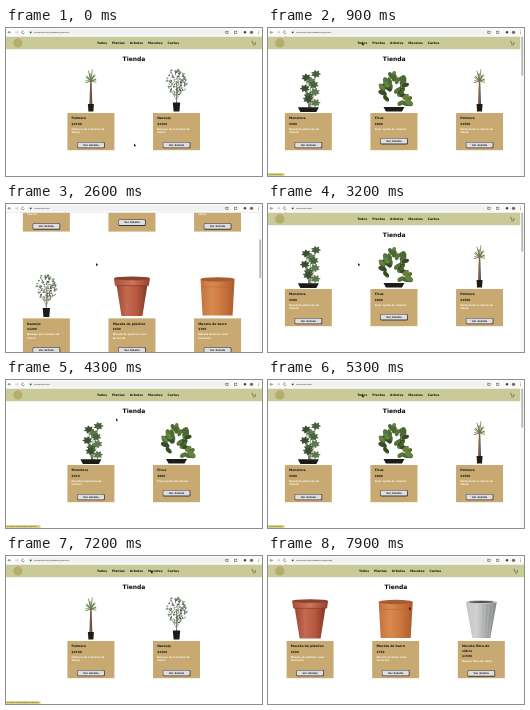
These frames come from a looping animation (256 px wide and 148 px high, 8000 ms). An HTML page with a canvas:

```html
<!DOCTYPE html>
<html lang="es">
<head>
<meta charset="utf-8">
<title>Tienda</title>
<style>
html, body { margin: 0; width: 100%; height: 100%; overflow: hidden; background: #fff; }
canvas { display: block; width: 256px; height: 148px; }
</style>
</head>
<body>
<canvas id="stage"></canvas>
<script>
const WIDTH = 256, HEIGHT = 148, LOOP = 8000, BAR = 8.6;
const TRAVEL = 450, URL_DELAY = 300, HINT_LINGER = 400;
const TAU = Math.PI * 2;
const BOLD = '"DejaVu Sans", Verdana, sans-serif';
const PLAIN = 'Roboto, Arial, sans-serif';
const HOST = 'localhost:3000';
const LINKS = ['Todos', 'Plantas', 'Arboles', 'Macetas', 'Cactus'];

const canvas = document.getElementById('stage');
const ctx = canvas.getContext('2d');
const ratio = window.devicePixelRatio || 1;
canvas.width = WIDTH * ratio;
canvas.height = HEIGHT * ratio;

const catalogue = [
  { kind: 'Plantas', name: ['Monstera'], price: '$500', about: ['Monstera deliciosa de', 'interior'], draw: drawMonstera },
  { kind: 'Plantas', name: ['Ficus'], price: '$800', about: ['Ficus lyrata de interior'], draw: drawFicus },
  { kind: 'Arboles', name: ['Palmera'], price: '$2500', about: ['Palmera de 2 metros de', 'altura'], draw: drawPalm },
  { kind: 'Arboles', name: ['Naranjo'], price: '$2200', about: ['Naranjo de 2 metros de', 'altura'], draw: drawOrange },
  { kind: 'Macetas', name: ['Maceta de plástico'], price: '$500', about: ['Maceta de plástico color', 'terracota'], draw: drawPlasticPot },
  { kind: 'Macetas', name: ['Maceta de barro'], price: '$700', about: ['Maceta de barro color', 'terracota'], draw: drawClayPot },
  { kind: 'Macetas', name: ['Maceta fibra de', 'vidrio'], price: '$1500', about: ['Maceta fibra de vidrio'], draw: drawFiberPot }
];

// The pointer arrives on a link, clicks it, then leaves for a resting place.
const start = { link: 'Arboles', x: 128, y: 115.5 };
const visits = [
  { link: 'Todos', arrive: 500, click: 650, leave: 1350, x: 90, y: 59 },
  { link: 'Plantas', arrive: 3750, click: 4050, leave: 4050, x: 112, y: 55 },
  { link: 'Todos', arrive: 4850, click: 4950, leave: 5350 },
  { link: 'Arboles', arrive: 5850, click: 5950, leave: 6050, x: 137, y: 52.5 },
  { link: 'Macetas', arrive: 7150, click: 7450, leave: 7450, x: 141, y: 51 }
];

const clamp = u => Math.min(1, Math.max(0, u));
const ease = u => clamp(u) ** 2 * (3 - 2 * clamp(u));
const mix = (a, b, u) => a + (b - a) * u;
const scrollAt = t => 143 * Math.sin(Math.PI * clamp((t - 2350) / 830)) ** 2;
const linkAt = t => visits.reduce((link, v) => t >= v.click ? v.link : link, start.link);
const urlOf = link => link === 'Todos' ? HOST : `${HOST}/category/${link.toLowerCase()}`;
const contentWidth = link => link === 'Todos' ? 252.5 : WIDTH;

function seeded(seed) {
  return () => (seed = (seed * 16807) % 2147483647) / 2147483647;
}

function text(value, x, y, size, color, { font = BOLD, align = 'left', weight = 'bold' } = {}) {
  ctx.font = `${weight} ${size}px ${font}`;
  ctx.textAlign = align;
  ctx.textBaseline = 'middle';
  ctx.fillStyle = color;
  ctx.fillText(value, x, y);
}

function rect(x, y, w, h, color) {
  ctx.fillStyle = color;
  ctx.fillRect(x, y, w, h);
}

function oval(x, y, rx, ry, color, angle = 0) {
  ctx.fillStyle = color;
  ctx.beginPath();
  ctx.ellipse(x, y, rx, ry, angle, 0, TAU);
  ctx.fill();
}

function line(x1, y1, x2, y2, color, width = 0.5) {
  ctx.strokeStyle = color;
  ctx.lineWidth = width;
  ctx.beginPath();
  ctx.moveTo(x1, y1);
  ctx.lineTo(x2, y2);
  ctx.stroke();
}

function taper(top, bottom, halfTop, halfBottom, color) {
  ctx.fillStyle = color;
  ctx.beginPath();
  ctx.moveTo(-halfTop, top);
  ctx.lineTo(halfTop, top);
  ctx.lineTo(halfBottom, bottom);
  ctx.lineTo(-halfBottom, bottom);
  ctx.fill();
}

function shade(half, ...colors) {
  const gradient = ctx.createLinearGradient(-half, 0, half, 0);
  colors.forEach((c, i) => gradient.addColorStop(i / (colors.length - 1), c));
  return gradient;
}

function lobedLeaf(x, y, size, angle, color) {
  ctx.fillStyle = color;
  ctx.beginPath();
  for (let a = 0; a < TAU; a += 0.2) {
    const r = size * (0.85 + 0.22 * Math.cos(a * 7));
    ctx.lineTo(x + r * Math.cos(a + angle), y + r * 0.8 * Math.sin(a + angle));
  }
  ctx.fill();
}

// Products stand on the card's top edge, centred on x = 0.
function drawMonstera() {
  const greens = ['#4a613e', '#384f31', '#607850'];
  for (let i = 0; i < 9; i++) {
    const x = 2 + 5.5 * Math.cos(i * 2.4), y = 46 + i * 3.6;
    line(1, 81, x, y, '#60784c', 0.6);
    lobedLeaf(x, y, 4.8, i, greens[i % 3]);
  }
  taper(79.3, 84, 10.5, 8, '#1b1b19');
}

function drawFicus() {
  const random = seeded(91), greens = ['#4c6833', '#65823f', '#344d28', '#587438'];
  for (let i = 0; i < 42; i++) {
    const a = -Math.PI * random(), r = 0.35 + 0.65 * Math.sqrt(random());
    const x = Math.cos(a) * r * 15.5, y = 76 + Math.sin(a) * r * 31;
    oval(x, y, 3.7, 2.1, greens[i % 4], a + random() - 0.5);
  }
  taper(79, 83.5, 10.5, 8, '#1b1b19');
}

function drawPalm() {
  const greens = ['#647b43', '#87995a', '#475f35'];
  taper(53, 79, 0.7, 1.5, shade(1.5, '#503b2d', '#87614a', '#3f3027'));
  for (let i = 0; i < 15; i++) {
    const a = -Math.PI * (i / 14 * 1.1 - 0.05);
    const reach = 9 + 3 * Math.sin(i * 2.3);
    line(0, 53, Math.cos(a) * 5.5, 53 + Math.sin(a) * reach, greens[i % 3], 0.8);
  }
  taper(76, 83.5, 3, 2.5, '#1b1b19');
}

function drawOrange() {
  const random = seeded(47), greens = ['#5d6b58', '#818d7c', '#465443', '#a0a899'];
  line(0, 77, 0, 53, '#67594c', 0.8);
  for (let i = 0; i < 115; i++) {
    const a = random() * TAU, r = Math.sqrt(random());
    const x = Math.cos(a) * r * 10.5, y = 54 + Math.sin(a) * r * 13.5;
    if (i % 16 === 0) line(0, 72, x, y, '#84887a', 0.4);
    oval(x, y, 1.25, 0.55, greens[i % 4], random() * Math.PI);
  }
  taper(74.5, 83.5, 3.7, 2.9, '#1b1b19');
}

function drawPlasticPot() {
  taper(51, 82.5, 15.5, 10.5, shade(15, '#9d4936', '#c46a50', '#b6583f', '#823828'));
  taper(45, 52, 18, 17, shade(18, '#a84f3a', '#ce765b', '#92402e'));
  oval(0, 45, 18, 1.8, '#8c402e');
  line(-16.5, 52.3, 16.5, 52.3, '#8b3c2a', 0.7);
}

function drawClayPot() {
  taper(46, 82, 17, 15, shade(17, '#c4713c', '#d98a50', '#ca743f', '#ad592c'));
  oval(0, 46, 17, 2.2, '#a85a30');
  line(-16.5, 53.5, 16.5, 53.5, '#b6632f');
}

function drawFiberPot() {
  taper(46, 82, 15.5, 9, shade(15, '#c2c3c4', '#d0d0d0', '#a3a5a6', '#85878a'));
  oval(0, 46, 15.5, 1.9, '#c9cacb');
  oval(0, 46, 12.5, 1.1, '#505254');
  for (let i = -3; i < 4; i++) line(i * 4, 48, i * 2.5, 81, '#dedede', 0.25);
}

function drawButton(y) {
  ctx.beginPath();
  ctx.roundRect(-13.7, y - 3.1, 27.6, 6.4, 1.3);
  ctx.fillStyle = '#3a3836';
  ctx.fill();
  ctx.beginPath();
  ctx.roundRect(-13.2, y - 2.6, 26.3, 5, 0.9);
  ctx.fillStyle = '#dedee0';
  ctx.fill();
  text('Ver detalle', 0, y, 2.5, '#272931', { align: 'center' });
}

function drawCard(product, x, offset) {
  ctx.save();
  ctx.translate(x, offset);
  product.draw();
  rect(-23.5, 85, 47, 37.2, '#c8a972');
  let y = 90.6;
  const write = (label, size, color, step) => {
    text(label, -19.3, y, size, color);
    y += step;
  };
  product.name.forEach(label => write(label, 3.1, '#14110d', 4.2));
  y += 1.3;
  write(product.price, 2.9, '#1c1812', 4.8);
  product.about.forEach(label => write(label, 2.45, '#fffaf0', 3.8));
  drawButton(y + 8.5);
  ctx.restore();
}

function linkLeft(link, middle) {
  ctx.font = `bold 3.1px ${BOLD}`;
  return LINKS.slice(0, LINKS.indexOf(link))
    .reduce((x, label) => x + ctx.measureText(label).width + 4.9, middle - 37);
}

function drawCart(x) {
  line(x - 2.2, 13.2, x - 1.3, 13.2, '#33332a', 0.45);
  line(x - 1.3, 13.2, x - 0.6, 16, '#33332a', 0.45);
  line(x - 0.6, 16, x + 1.6, 16, '#33332a', 0.45);
  line(x + 1.6, 16, x + 2, 14, '#33332a', 0.45);
  for (const dx of [-0.3, 1.3]) oval(x + dx, 17.1, 0.45, 0.45, '#33332a');
}

function drawPage(link, scroll) {
  const width = contentWidth(link), middle = width / 2;
  const shown = catalogue.filter(p => link === 'Todos' || p.kind === link);
  ctx.save();
  ctx.beginPath();
  ctx.rect(0, BAR, WIDTH, HEIGHT - BAR);
  ctx.clip();
  ctx.translate(0, -scroll);
  rect(0, BAR, width, 12.6, '#c9ca98');
  oval(11.8, 15, 4.7, 4.7, '#b5ae6c');
  LINKS.forEach(label => text(label, linkLeft(label, middle), 15.2, 3.1, '#14140f'));
  drawCart(width - 8.3);
  text('Tienda', middle, 31.2, 6, '#0c0c0c', { align: 'center' });
  shown.forEach((product, i) => {
    const row = Math.floor(i / 3);
    const columns = Math.min(3, shown.length - row * 3);
    drawCard(product, middle - 0.3 + (i % 3 - (columns - 1) / 2) * 85.6, row * 124);
  });
  ctx.restore();
  if (width < WIDTH) {
    rect(width, BAR, WIDTH - width, HEIGHT - BAR, '#f8f8f8');
    rect(width + 0.9, 9 + scroll * 0.281, 1.7, 38.5, '#b5b5b5');
  }
}

function drawArrow(x, direction, color) {
  const tip = x + direction * 1.5;
  line(x - 1.5, 4.3, x + 1.5, 4.3, color);
  for (const dy of [-1.4, 1.4]) line(tip, 4.3, tip - direction * 1.4, 4.3 + dy, color);
}

function drawToolbar(url) {
  const ink = '#3f4144';
  rect(0, 0, WIDTH, BAR, '#fbfbfb');
  ctx.beginPath();
  ctx.roundRect(22, 1.3, 203, 6, 3);
  ctx.fillStyle = '#f0f1f2';
  ctx.fill();
  drawArrow(3.5, -1, ink);
  drawArrow(10.5, 1, '#aaacaf');
  ctx.strokeStyle = ink;
  ctx.lineWidth = 0.5;
  ctx.beginPath();
  ctx.arc(17, 4.3, 1.4, 0.2, 5.3);
  ctx.stroke();
  oval(24.7, 4.3, 0.9, 0.9, ink);
  text(url, 28, 4.5, 2.4, '#26282b', { font: PLAIN, weight: 'normal' });
  ctx.strokeRect(219.8, 3.2, 2.2, 2.2);
  ctx.strokeRect(228.5, 3.1, 2.4, 2.4);
  oval(239, 4.3, 1.2, 1.2, ink);
  oval(245.5, 4.3, 1.6, 1.6, '#80604f');
  for (let i = -1; i < 2; i++) oval(252.5, 4.3 + i * 1.4, 0.4, 0.4, ink);
  rect(0, 8.1, WIDTH, 0.5, '#dedfdf');
}

function drawHint(t) {
  const visit = visits.find(v => t >= v.arrive - 50 && t < v.leave + HINT_LINGER);
  if (!visit) return;
  const url = urlOf(visit.link);
  rect(0, 145, url === HOST ? 16.5 : 34.5, 3, '#ddd384');
  text(url, 0.8, 146.7, 2.05, '#4a4420', { font: PLAIN, weight: 'normal' });
}

function pointerAt(t) {
  let { x, y } = start;
  const move = (toX, toY, u) => {
    x = mix(x, toX, ease(u));
    y = mix(y, toY, ease(u));
  };
  for (const v of visits) {
    const middle = contentWidth(linkAt(v.arrive)) / 2;
    move(linkLeft(v.link, middle) + 3, 14.4, (t - v.arrive) / TRAVEL + 1);
    if (v.x) move(v.x, v.y, (t - v.leave) / TRAVEL);
  }
  return [x, y];
}

function drawPointer([x, y]) {
  ctx.fillStyle = '#171717';
  ctx.beginPath();
  ctx.moveTo(x, y);
  ctx.lineTo(x, y + 3);
  ctx.lineTo(x + 0.9, y + 2.3);
  ctx.lineTo(x + 2.1, y + 2.1);
  ctx.fill();
  line(x + 0.8, y + 2, x + 1.4, y + 3.3, '#171717');
}

function render() {
  const t = performance.now() % LOOP;
  ctx.setTransform(ratio, 0, 0, ratio, 0, 0);
  rect(0, 0, WIDTH, HEIGHT, '#fff');
  drawPage(linkAt(t), scrollAt(t));
  drawToolbar(urlOf(linkAt(t - URL_DELAY)));
  drawHint(t);
  drawPointer(pointerAt(t));
  requestAnimationFrame(render);
}
render();
</script>
</body>
</html>
```
